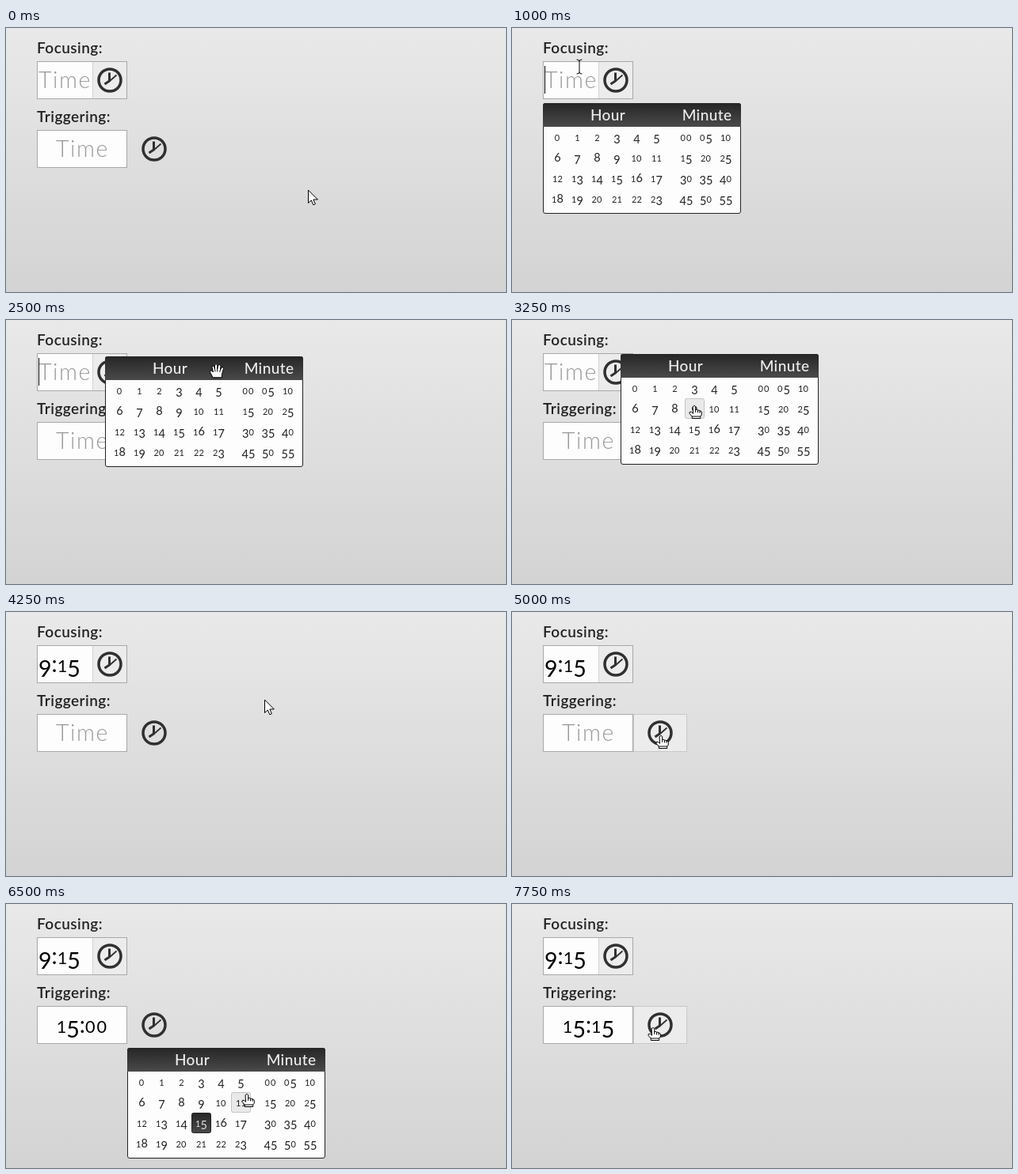
Animation of 631x334 px, one loop 8 s. Source, as an HTML page:

```html
<!DOCTYPE html>
<html lang="en">
<head>
<meta charset="utf-8">
<title>Time picker</title>
<style>
  html, body { margin: 0; width: 100%; height: 100%; overflow: hidden; }
  body { background: linear-gradient(#e9e9e9, #d3d3d3); }
  svg { display: block; width: 631px; height: 334px; font-family: Lato, "Open Sans", sans-serif; }
  .label { font-size: 19px; font-weight: 600; letter-spacing: .45px; fill: #222; }
  .head { font-size: 19px; font-weight: 500; letter-spacing: .4px; fill: #eee; }
  .cell { font-size: 14.5px; fill: #222; }
  .value { font-size: 28.5px; fill: #000; }
  .value.empty { font-weight: 300; letter-spacing: 1.6px; fill: #999; }
  .mid { text-anchor: middle; }
  /* Old-style figures */
  .small { font-size: .76em; }
  .round { font-size: .76em; letter-spacing: .1em; }
  .low { baseline-shift: -.2em; }
  .hover { fill: #e9e9e9; stroke: #c4c4c4; }
  .picked { fill: url(#dark); stroke: #222; }
  .picked + text { fill: #ddd; }
  .none { fill: none; }
  .cursor { fill: #fff; stroke: #000; stroke-linejoin: round; stroke-linecap: round; }
</style>
</head>
<body>
<svg viewBox="0 0 631 334">
  <defs>
    <linearGradient id="dark" x2="0" y2="1">
      <stop stop-color="#262626"/><stop offset="1" stop-color="#4a4a4a"/>
    </linearGradient>
    <g id="clock" fill="none" stroke="#303030">
      <circle r="14" stroke-width="3.5"/>
      <path d="M-.5 1.5V-9.5M-.5 1L-6.5 5" stroke-width="3"/>
      <path d="M-.5 1.5L8.5 -6.5" stroke-width="1.7"/>
    </g>
    <path id="arrow" d="M.5 .5V16.5L4.3 13L6.8 18.8L9.4 17.7L6.9 12H12Z"/>
    <g id="beam">
      <path d="M-3 -9Q0 -9 0 -7Q0 -9 3 -9M0 -7V7M-3 9Q0 9 0 7Q0 9 3 9" fill="none"/>
    </g>
    <g id="point">
      <path d="M-1.7 1.5Q0 -1 1.7 1.5V5.5Q3.5 4.8 4.5 6.2Q6 5.7 7 7Q9.3 6.8 9.3 9V12L7.7 14.2V16.5H-2.7V14.2L-6 10.3Q-6.5 7.5 -3.7 8.3L-1.7 10Z"/>
      <path d="M1.7 5.5V8.5M4.5 6.5V9M7 7V9.3M-2.7 14H7.5" fill="none"/>
    </g>
    <g id="grab">
      <path d="M-5 8.5L-8.5 2Q-9 -.5 -6.5 0L-4.5 2L-6 -4.5Q-5.5 -7 -3.5 -5.5L-2.5 -2V-7Q-1 -9.5 .7 -7V-2L2 -7Q4 -8.5 5 -6L4.5 -1L6 -4Q8.5 -5 8.5 -2.5L6.5 4.5V8.5Z"/>
      <path d="M-2.5 -2L-2 1M.7 -2V1M4.5 -1L3.8 1.5" fill="none"/>
    </g>
  </defs>

  <text class="label" x="39" y="32">Focusing:</text>
  <rect x="39.5" y="42.5" width="113" height="47" fill="#fdfdfd" stroke="#a8a8a8"/>
  <path d="M109 43H152V89H109Z" fill="#ececec"/>
  <path d="M109.5 43V89" stroke="#d2d2d2"/>
  <use href="#clock" x="131" y="66"/>
  <text id="first" x="41" y="76"></text>
  <path id="caret" d="M41.5 48V83" stroke="#000"/>

  <text class="label" x="39" y="119">Triggering:</text>
  <rect id="trigger" x="153.5" y="129.5" width="67" height="47" fill="#ececec" stroke="#c8c8c8"/>
  <rect x="39.5" y="129.5" width="113" height="47" fill="#fdfdfd" stroke="#a8a8a8"/>
  <use href="#clock" x="187" y="153"/>
  <text id="second" x="96.5" y="163"></text>

  <g id="picker">
    <rect x=".5" y=".5" width="249" height="139" rx="2.5" fill="#fdfdfd" stroke="#222"/>
    <path d="M0 30V3Q0 0 3 0H247Q250 0 250 3V30Z" fill="url(#dark)"/>
    <text class="head mid" x="82" y="22">Hour</text>
    <text class="head mid" x="207" y="22">Minute</text>
    <g id="cells"></g>
  </g>
  <use id="cursor" class="cursor"/>
</svg>
<script>
const $ = id => document.getElementById(id);
const LOOP = 8000, STEP = 250;

// Pointer path: time, x, y
const path = [
  [0, 381, 205], [500, 170, 75], [750, 85, 48], [1000, 85, 49], [1250, 90, 62],
  [1500, 120, 104], [2000, 180, 113], [2250, 223, 89], [2500, 266, 64], [2750, 278, 61],
  [3250, 230, 108], [3500, 230, 109], [3750, 326, 111], [4250, 326, 111],
  [4750, 200, 153], [5000, 188, 156], [5250, 187, 157], [5500, 205, 187],
  [6000, 246, 272], [6250, 247, 273], [6500, 304, 240], [6750, 334, 246],
  [7000, 334, 246], [7750, 178, 156]
];

function pointer(t) {
  const i = Math.max(1, path.findIndex(p => p[0] >= t));
  const [a, b] = [path[i - 1], path[i]];
  const k = Math.min(1, (t - a[0]) / (b[0] - a[0]));
  return [1, 2].map(n => Math.round(a[n] + (b[n] - a[n]) * k));
}

const digits = s => s.replace(/\d/g, d => {
  const kind = d === "0" ? "round" : "12".includes(d) ? "small" : "34579".includes(d) ? "low" : "";
  return `<tspan class="${kind}">${d}</tspan>`;
});

const cells = [];
function addCells(cols, left, label) {
  for (let i = 0; i < cols * 4; i++) {
    const x = left + 25 * (i % cols), y = 30 + 26 * Math.floor(i / cols);
    cells.push({ x, y, name: label(i) });
  }
}
addCells(6, 6, i => `${i}`);
addCells(3, 168.5, i => `${i * 5}`.padStart(2, "0"));
$("cells").innerHTML = cells.map(c =>
  `<rect x="${c.x + .5}" y="${c.y + .5}" width="24" height="25" rx="2"/>` +
  `<text class="cell mid" x="${c.x + 12.5}" y="${c.y + 17.5}">${digits(c.name)}</text>`).join("");
const boxes = $("cells").querySelectorAll("rect");

const inside = ([px, py], x, y, w, h) => px >= x && px < x + w && py >= y && py < y + h;
const show = (id, on) => $(id).setAttribute("visibility", on ? "visible" : "hidden");

function setValue(id, value, extra) {
  $(id).setAttribute("class", `value ${value ? "" : "empty"} ${extra}`);
  $(id).innerHTML = value ? digits(value) : "Time";
}

function draw(t) {
  const p = pointer(t);
  const dragged = pointer(Math.min(2750, Math.max(2000, t)));
  const [x, y] = t < 4250 ? [dragged[0] - 141, dragged[1] - 18] : [153, 182];
  const open = t >= 1000 && t < 4250 || t >= 5250 && t < 7000;
  const inPicker = open && inside(p, x, y, 250, 140);
  const inHead = inPicker && p[1] < y + 30;
  const onTrigger = !inPicker && inside(p, 153, 129, 68, 48);
  const hidden = t === 5750;

  setValue("first", t < 3500 ? "" : t < 4250 ? "9:00" : "9:15", "");
  setValue("second", t < 6250 ? "" : t < 7000 ? "15:00" : "15:15", "mid");
  show("caret", t >= 1000 && t < 2750);
  show("trigger", onTrigger);
  show("picker", open);
  $("picker").setAttribute("transform", `translate(${x} ${y})`);

  const picked = t >= 6250 ? 15 : t >= 3500 && t < 4250 ? 9 : -1;
  cells.forEach((c, i) => {
    const over = inPicker && !hidden && inside(p, x + c.x, y + c.y, 25, 26);
    boxes[i].setAttribute("class", i === picked ? "picked" : over ? "hover" : "none");
  });

  const shape = inHead ? "grab" : inPicker || onTrigger ? "point"
    : inside(p, 39, 42, 70, 48) ? "beam" : "arrow";
  const cursor = $("cursor");
  cursor.setAttribute("href", "#" + shape);
  cursor.setAttribute("x", p[0]);
  cursor.setAttribute("y", p[1]);
  show("cursor", !hidden);
}

const start = performance.now();
let last = -1;
function tick() {
  const t = Math.floor((performance.now() - start) % LOOP / STEP) * STEP;
  if (t !== last) draw(last = t);
  requestAnimationFrame(tick);
}
tick();
</script>
</body>
</html>
```
